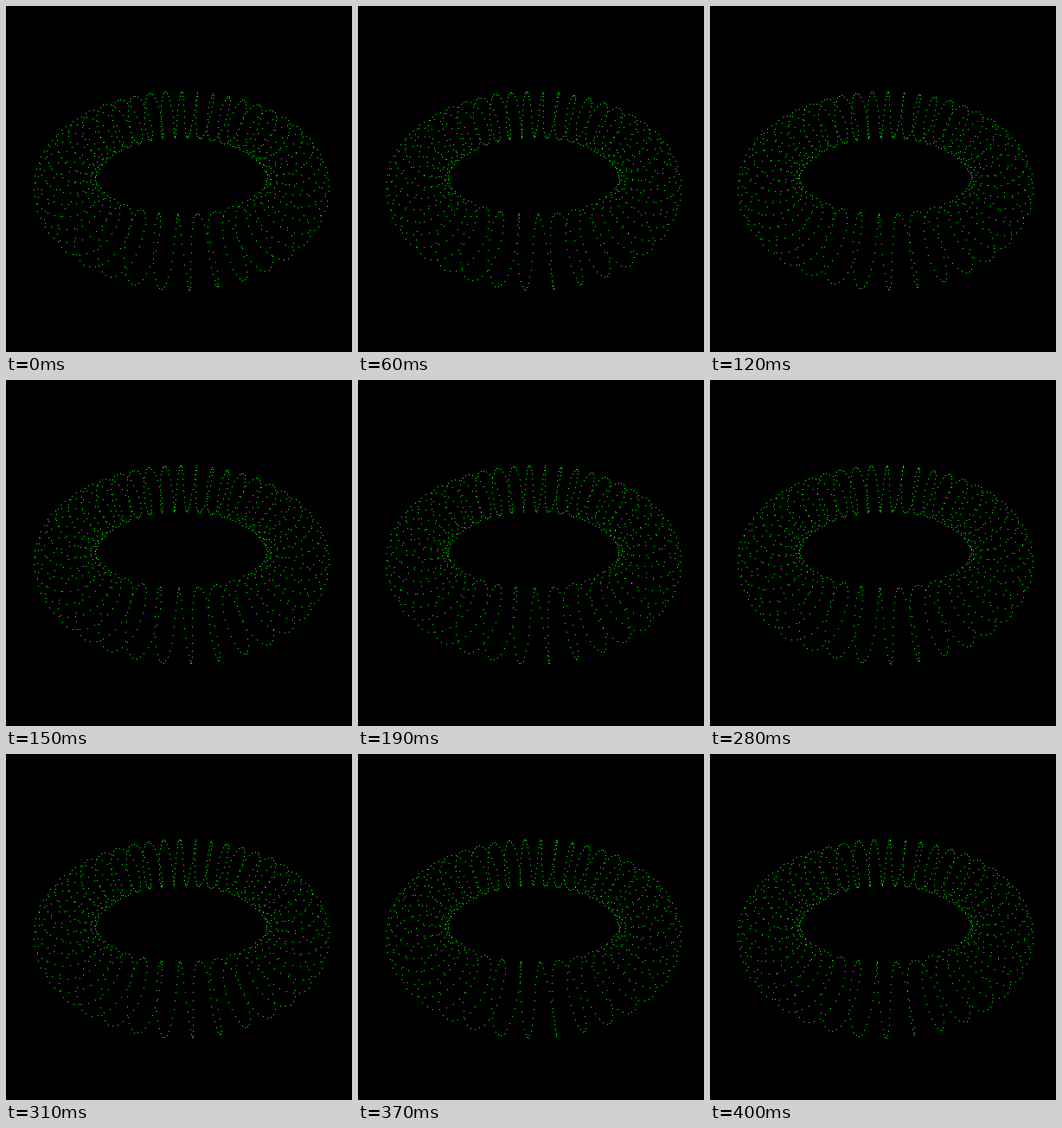
Write an HTML page with a canvas that moves like this. It is 400 px wide and 400 px high and loops after 0.43 s.

```html
<!DOCTYPE html>
<html>
<head>
<meta charset="utf-8">
<title>Coil torus</title>
<style>
  html, body { margin: 0; width: 100%; height: 100%; overflow: hidden; background: #000; }
  canvas { display: block; }
</style>
</head>
<body>
<canvas id="stage" width="400" height="400"></canvas>
<script>
const ctx = document.getElementById('stage').getContext('2d');
const LOOP = 430, STEP = 30;
const DOTS = 1000, TURNS = 40;
const RING = 0.29, TUBE = 0.0725;      // radii, relative to the camera distance
const FOCAL = 448, CX = 203, CY = 186;
const TILT = 35 * Math.PI / 180;
const START = 0.028, SPIN = 0.0331;    // radians, radians per step
const sinT = Math.sin(TILT), cosT = Math.cos(TILT);

function project(x, y, z) {
  const scale = FOCAL / (1 - z * cosT - y * sinT);
  return [CX + x * scale, CY - (y * cosT - z * sinT) * scale];
}

function draw(step) {
  ctx.fillStyle = '#000';
  ctx.fillRect(0, 0, 400, 400);
  ctx.fillStyle = '#0f0';
  for (let i = 0; i < DOTS; i++) {
    const along = i / DOTS * 2 * Math.PI;
    const around = -TURNS * along;
    const angle = along + START + SPIN * step;
    const radius = RING + TUBE * Math.cos(around);
    const [x, y] = project(radius * Math.sin(angle), TUBE * Math.sin(around), radius * Math.cos(angle));
    ctx.fillRect(Math.floor(x), Math.floor(y), 1, 1);
  }
}

function tick() {
  const t = performance.now() % LOOP;
  // the sixth pose is held 10 ms longer
  draw(Math.floor((t < 160 ? t : t - 10) / STEP));
  requestAnimationFrame(tick);
}
tick();
</script>
</body>
</html>
```
